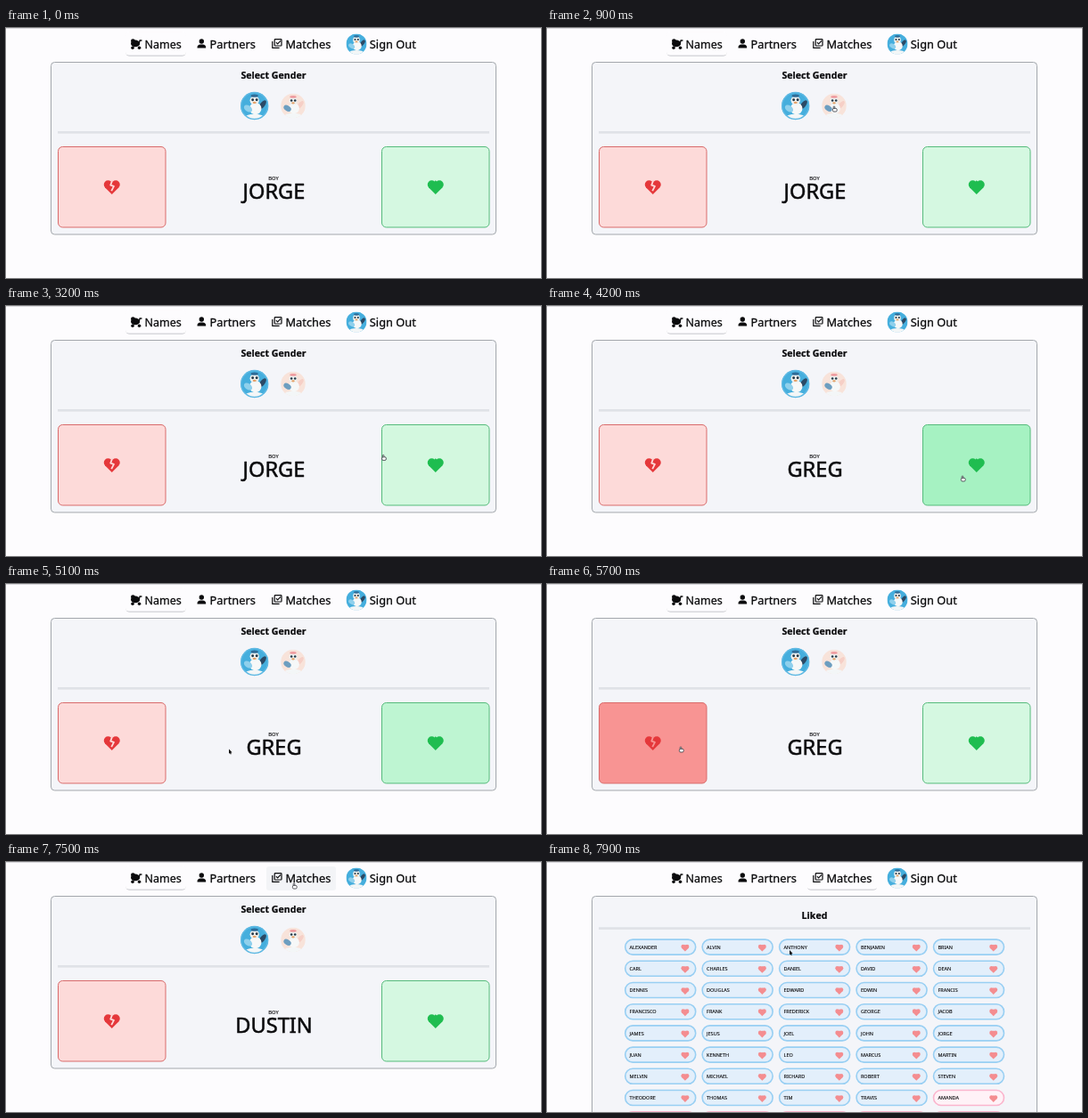
Recreate the animation shown at these times as an HTML page with a canvas. Size 600 px wide and 281 px high, loop 8000 ms.

```html
<!DOCTYPE html>
<html lang="en">
<head>
<meta charset="utf-8">
<title>Baby name picker</title>
<style>
  html, body { margin: 0; width: 100%; height: 100%; overflow: hidden; background: #fdfcfe; }
  canvas { display: block; width: 600px; height: 281px; }
</style>
</head>
<body>
<canvas id="stage"></canvas>
<script>
const W = 600, H = 281, LOOP = 8000, STEP = 100, FADE = 500;
const PAGE = '#fdfcfe', PANEL = '#f4f5f9', INK = '#0b0b0d', RULE = '#dfe2e7';
const canvas = document.getElementById('stage');
const g = canvas.getContext('2d');
const ratio = window.devicePixelRatio || 1;
canvas.width = W * ratio;
canvas.height = H * ratio;

// When each click lands
const CLICK = { girl: 1100, boy: 2400, like: 4000, dislike: 6000, list: 7700 };

// Places where the pointer rests, from `come` until `go`
const stops = [
  { x: 400, y: 112, come: 0, go: 300 },
  { x: 322, y: 88, come: 900, go: 2000 },
  { x: 279, y: 88, come: 2300, go: 2600 },
  { x: 466, y: 191, come: 3470, go: 4700 },
  { x: 150, y: 183, come: 5340, go: 6250 },
  { x: 323, y: 24, come: 7070, go: CLICK.list },
  { x: 272, y: 99, come: 7900, go: LOOP }
];

const zones = {
  dislike: { x: 58.5, y: 133.5, w: 120.5, h: 90.5 },
  like: { x: 421.5, y: 133.5, w: 120.5, h: 90.5 },
  genders: { x: 264, y: 72, w: 73, h: 31 },
  matches: { x: 292, y: 5, w: 78, h: 27 }
};

const liked = `ALEXANDER ALVIN ANTHONY BENJAMIN BRIAN CARL CHARLES DANIEL DAVID DEAN
DENNIS DOUGLAS EDWARD EDWIN FRANCIS FRANCISCO FRANK FREDERICK GEORGE JACOB
JAMES JESUS JOEL JOHN JORGE JUAN KENNETH LEO MARCUS MARTIN
MELVIN MICHAEL RICHARD ROBERT STEVEN THEODORE THOMAS TIM TRAVIS AMANDA`.split(/\s+/);

const clamp = v => Math.max(0, Math.min(1, v));
const smooth = v => v * v * (3 - 2 * v);
const mix = (a, b, k) => `rgb(${a.map((v, i) => Math.round(v + (b[i] - v) * k))})`;
const inside = (p, z, pad = 0) =>
  p.x > z.x - pad && p.x < z.x + z.w + pad && p.y > z.y - pad && p.y < z.y + z.h + pad;

function pointer(t) {
  const i = Math.max(1, stops.findIndex(s => t <= s.come));
  const a = stops[i - 1], b = stops[i];
  if (t > stops.at(-1).come) return stops.at(-1);
  const k = smooth(clamp((t - a.go) / (b.come - a.go)));
  return { x: a.x + (b.x - a.x) * k, y: a.y + (b.y - a.y) * k };
}

// Share of the last moments that the pointer spent in a zone
function glow(t, zone) {
  const n = 20;
  let hits = 0;
  for (let i = 0; i < n; i++) if (inside(pointer(Math.max(0, t - i * FADE / n)), zone)) hits++;
  return hits / n;
}

function text(s, x, y, size, align = 'left', weight = 400) {
  g.font = `${weight} ${size}px "Noto Sans", "Open Sans", sans-serif`;
  g.textAlign = align;
  g.fillStyle = g.strokeStyle = INK;
  g.lineJoin = 'round';
  g.lineWidth = size * 0.022;
  g.fillText(s, x, y);
  g.strokeText(s, x, y);
}

function box(x, y, w, h, r, fill, line, width = 1) {
  g.beginPath();
  g.roundRect(x, y, w, h, r);
  if (fill) { g.fillStyle = fill; g.fill(); }
  if (line) { g.strokeStyle = line; g.lineWidth = width; g.stroke(); }
}

function oval(x, y, rx, ry, fill, turn = 0) {
  g.beginPath();
  g.ellipse(x, y, rx, ry, turn, 0, 7);
  g.fillStyle = fill;
  g.fill();
}

function line(points, color, width) {
  g.beginPath();
  points.forEach(([x, y]) => g.lineTo(x, y));
  g.strokeStyle = color;
  g.lineWidth = width;
  g.stroke();
}

function at(x, y, scale, draw) {
  g.save();
  g.translate(x, y);
  g.scale(scale, scale);
  draw();
  g.restore();
}

// Two lobes over a rotated square
function heart(x, y, size, fill, crack) {
  at(x, y, size / 18, () => {
    oval(-4.3, -3.2, 4.7, 4.7, fill);
    oval(4.3, -3.2, 4.7, 4.7, fill);
    g.save();
    g.rotate(Math.PI / 4);
    g.fillRect(-5.5, -5.5, 11, 11);
    g.restore();
    if (crack) line([[0.5, -8], [-1.5, -2.5], [2.2, -1.2], [-0.5, 4]], crack, 1.8);
  });
}

// Round portrait of a bird, drawn with radius 15
function bird(x, y, r, boy) {
  at(x, y, r / 15, () => {
    g.beginPath();
    g.arc(0, 0, 15, 0, 7);
    g.clip();
    g.fillStyle = boy ? '#45aedd' : '#f8e3da';
    g.fillRect(-15, -15, 30, 30);
    oval(0, 13, 11, 4, '#f3f6f7');
    oval(8.5, -1, 6, 2.6, boy ? '#2b4a66' : '#f6cfc6', -0.9);
    oval(1, 3, 6.5, 6.5, '#f6f8f8');
    oval(0, -6, 5, 5, '#eef1f0');
    oval(-7, 3, 5, 3.2, boy ? '#8fd0ec' : '#6d9ec0', 0.6);
    oval(-2, -6.5, 1.4, 1.4, '#263947');
    oval(2.4, -6.5, 1.4, 1.4, '#263947');
    oval(0, -3.4, 2, 1.1, '#e5a065');
    oval(0, -11, 4, 1.6, boy ? '#2f6b96' : '#ee9b9f');
  });
}

function stroller() {
  oval(145, 17.4, 5, 3.9, INK);
  oval(142.4, 14.6, 2.4, 2.4, INK);
  line([[149, 19], [150, 14], [152.4, 14]], INK, 1.3);
  for (const x of [142, 149.5]) oval(x, 22.2, 1.8, 1.8, INK);
}

function person() {
  oval(219.3, 15, 2.7, 2.7, INK);
  box(214.5, 18.6, 9.7, 4, [4, 4, 0.5, 0.5], INK);
}

function checks() {
  line([[298.8, 15], [298.8, 22.4], [306.6, 22.4]], INK, 1.2);
  box(301.2, 12.6, 7.8, 7.4, 0.8, null, INK, 1.2);
  line([[302.9, 16.2], [304.6, 17.9], [308, 14.3]], INK, 1.2);
}

function tab(x, w) {
  box(x, 6, w, 25.6, 4, '#b4b5bb');
  box(x - 0.5, 4.5, w + 1, 26.2, 4, PAGE);
}

function nav(t) {
  g.fillStyle = '#dcdbdf';
  g.fillRect(0, 0, W, 1);
  const m = zones.matches;
  if (t >= CLICK.list) tab(m.x, m.w);
  else {
    tab(134.5, 67);
    box(m.x, m.y, m.w, m.h, 3, mix([253, 252, 254], [243, 244, 247], glow(t, m)));
  }
  stroller();
  person();
  checks();
  text('Names', 155.5, 22.8, 12.5);
  text('Partners', 228.5, 22.8, 12.8);
  text('Matches', 313.5, 22.8, 12.8);
  bird(393, 18, 11.5, true);
  text('Sign Out', 407.8, 23.3, 12.8);
}

function panel(title, y, size, ruleY, h) {
  box(50.5, 38.5, 499, h, 4, PANEL, '#a3a7ac');
  text(title, 300, y, size, 'center', 700);
  g.fillStyle = RULE;
  g.fillRect(58, ruleY, 484, 2.6);
}

function choice(z, fill, edge, color, crack) {
  box(z.x, z.y, z.w, z.h, 5, fill, edge);
  heart(z.x + z.w / 2, z.y + z.h / 2 + 0.4, 18, color, crack);
}

function picker(t) {
  const girl = t >= CLICK.girl && t < CLICK.boy;
  const name = girl ? 'CATHERINE' : t < CLICK.like ? 'JORGE' : t < CLICK.dislike ? 'GREG' : 'DUSTIN';
  panel('Select Gender', 57, 10.6, 116, 193.5);

  bird(278.7, 87.5, 15.5, true);
  bird(322, 87.5, 13.8, false);
  g.lineWidth = 1.4;
  g.strokeStyle = girl ? '#f2959b' : '#5fb9e3';
  g.beginPath();
  g.arc(girl ? 321.7 : 278.7, 87.5, 15, 0, 7);
  g.stroke();

  const red = mix([253, 218, 217], [248, 148, 147], glow(t, zones.dislike));
  const green = mix([213, 248, 225], [166, 242, 194], glow(t, zones.like));
  choice(zones.dislike, red, '#d96a6a', '#e5383b', red);
  choice(zones.like, green, '#55bb7b', '#1fbd50');

  text(girl ? 'GIRL' : 'BOY', 300, 170.5, 5.8, 'center');
  text(name, 300.5, 192.3, 23.6, 'center');
}

function likedList() {
  panel('Liked', 64, 10.6, 73.3, 300);
  for (let i = 0; i < 45; i++) {
    const x = 87.7 + (i % 5) * 86.45, y = 95.5 + Math.floor(i / 5) * 24.2;
    const blue = i < 39;
    box(x, y - 8.4, 79, 17, 8.5, blue ? '#e3effb' : '#fff2f7', blue ? '#98cff3' : '#fbb5cd', 1.6);
    heart(x + 67.2, y + 1.2, 9, '#f48d90');
    if (liked[i]) text(liked[i], x + 4.9, y + 2.2, 5.5);
  }
}

function cursor(t) {
  if (t < 200) return;
  const p = pointer(t);
  const hand = t < CLICK.list && Object.values(zones).some(z => inside(p, z, 11));
  at(p.x, p.y, 1, () => {
    if (hand) {
      box(-0.8, 0, 1.6, 4, 0.8, '#fff', '#44474d', 0.9);
      box(-1.6, 2.4, 4.8, 3.6, 1.4, '#fff', '#44474d', 0.9);
    } else {
      line([[1, 3], [2.3, 5.8]], '#111', 1.1);
      g.beginPath();
      g.moveTo(0, 0);
      g.lineTo(0, 5);
      g.lineTo(3.5, 3.7);
      g.fillStyle = '#111';
      g.fill();
    }
  });
}

function draw() {
  const t = Math.floor((performance.now() % LOOP) / STEP) * STEP;
  g.setTransform(ratio, 0, 0, ratio, 0, 0);
  g.fillStyle = PAGE;
  g.fillRect(0, 0, W, H);
  nav(t);
  if (t < CLICK.list) picker(t);
  else likedList();
  cursor(t);
  requestAnimationFrame(draw);
}
draw();
</script>
</body>
</html>
```
